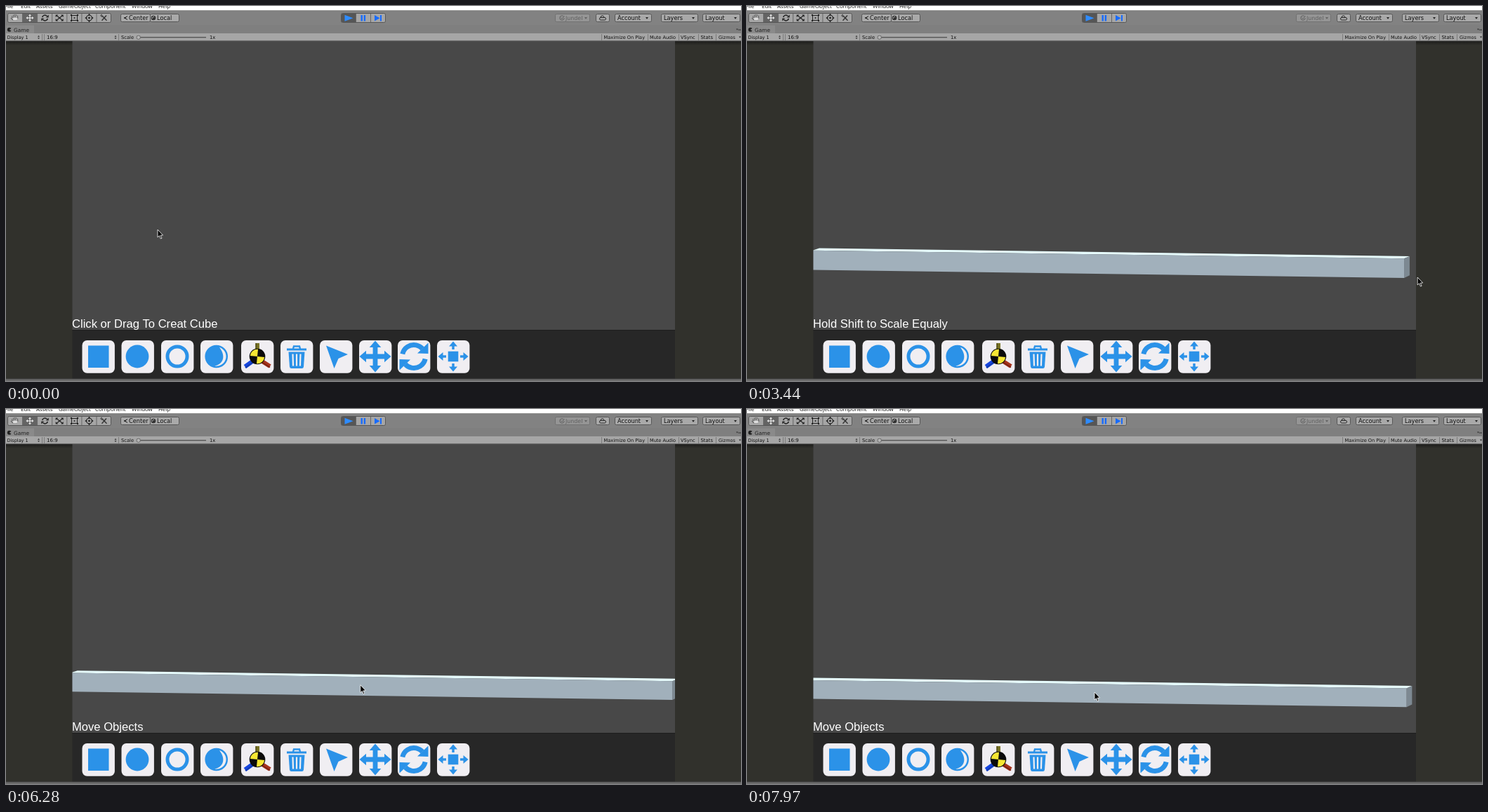
An HTML page with a canvas for the animation above (8000 ms loop, 1047x535 px).

```html
<!DOCTYPE html>
<html lang="en">
<head>
<meta charset="utf-8">
<title>Cube editor</title>
<style>
html, body { margin: 0; width: 100%; height: 100%; overflow: hidden; background: #31312c; }
canvas { display: block; }
</style>
</head>
<body>
<canvas id="stage" width="1047" height="535"></canvas>
<script>
const W = 1047, H = 535, LOOP = 8000;
const BLUE = '#2b92e8', PALE = '#f0eef2', TINT = '#e0dfe4';
const view = { x: 94.5, y: 50, w: 858.5, h: 412 };
const screen = document.getElementById('stage').getContext('2d');
let g = screen;

// Drawing helpers
function rect(x, y, w, h, fill) {
  g.fillStyle = fill;
  g.fillRect(x, y, w, h);
}
function poly(points, fill) {
  g.beginPath();
  points.forEach(p => g.lineTo(p[0], p[1]));
  g.closePath();
  g.fillStyle = fill;
  g.fill();
}
function line(points, color, width = 1) {
  g.beginPath();
  points.forEach(p => g.lineTo(p[0], p[1]));
  g.strokeStyle = color;
  g.lineWidth = width;
  g.stroke();
}
function disc(x, y, r, fill) {
  g.beginPath();
  g.arc(x, y, r, 0, 7);
  g.fillStyle = fill;
  g.fill();
}
function arc(x, y, r, from, to, color, width) {
  g.beginPath();
  g.arc(x, y, r, from, to);
  g.strokeStyle = color;
  g.lineWidth = width;
  g.stroke();
}
function round(x, y, w, h, r, fill, edge) {
  g.beginPath();
  g.roundRect(x, y, w, h, r);
  g.fillStyle = fill;
  g.fill();
  if (edge) {
    g.strokeStyle = edge;
    g.lineWidth = 1;
    g.stroke();
  }
}
function text(str, x, y, size, color = '#111', font = '"DejaVu Sans", sans-serif') {
  g.font = size + 'px ' + font;
  g.fillStyle = color;
  g.fillText(str, x, y);
}
function at(x, y, draw, turn = 0) {
  g.save();
  g.translate(x, y);
  g.rotate(turn);
  draw();
  g.restore();
}
function spin(x, y, draw) {
  for (let i = 0; i < 4; i++) at(x, y, draw, i * Math.PI / 2);
}

// Editor chrome
function menu() {
  rect(0, 0, W, 6.5, '#fff');
  const items = [['File', -2], ['Edit', 21], ['Assets', 43], ['GameObject', 75],
    ['Component', 127], ['Window', 179], ['Help', 217]];
  items.forEach(([s, x]) => text(s, x, 2.6, 7.9, '#111', '"Open Sans", sans-serif'));
}
function pill(x, w, label, tx) {
  round(x + .5, 11.5, w - 1, 11, 2, '#a9a9a9', '#565656');
  if (label) text(label, tx, 20, 8.2);
}
function drop(x, color = '#222') {
  poly([[x - 2, 16], [x + 2, 16], [x, 18.7]], color);
}
function tools() {
  round(2.5, 10.5, 147, 13, 2, '#a6a6a6', '#565656');
  rect(23, 11, 21, 12, '#646464');
  for (let x = 23.5; x < 140; x += 21.1) line([[x, 11], [x, 23]], '#666');

  // hand
  [['#222', 2.6], ['#ddd', 1.1]].forEach(([color, width]) => {
    [10.2, 12.2, 14.2, 16].forEach((x, i) => line([[x, 18], [x - .4, i % 3 ? 12.7 : 14]], color, width));
    line([[10.5, 19.5], [7.8, 16.5]], color, width);
    round(10, 16.5, 6, 4, 1.5, color);
  });
  // move
  spin(34, 17, () => {
    line([[0, 0], [4, 0]], '#e8e8e8', 1.2);
    poly([[3, -2], [5.5, 0], [3, 2]], '#e8e8e8');
  });
  // rotate
  [0, Math.PI].forEach(a => at(55.5, 17, () => {
    arc(0, 0, 3.9, 3.4, 5.5, '#222', 1.6);
    poly([[5.2, -4.6], [5.2, -.6], [1.2, -.8]], '#222');
  }, a));
  // scale
  line([[72.5, 14], [80, 20]], '#222', 1.2);
  line([[72.5, 20], [80, 14]], '#222', 1.2);
  [-1, 1].forEach(u => [-1, 1].forEach(v => {
    const x = 76.2 + u * 5.5, y = 17 + v * 4.5;
    poly([[x, y], [x - u * 3.6, y], [x, y - v * 3.4]], '#222');
  }));
  // rectangle
  g.strokeStyle = '#222';
  g.lineWidth = 1;
  g.strokeRect(93.5, 13.5, 8, 7);
  disc(97.5, 17, 1, '#222');
  [[93, 13], [102, 13], [93, 21], [102, 21]].forEach(p => disc(p[0], p[1], 1.2, '#222'));
  // transform
  arc(118.5, 17, 4, 0, 7, '#222', 1);
  disc(118.5, 17, 1.4, '#222');
  spin(118.5, 17, () => poly([[3.4, -2], [6.2, 0], [3.4, 2]], '#222'));
  // custom
  line([[136.5, 13.5], [143.5, 20.7]], '#333', 1.4);
  line([[143, 13.5], [136.5, 20.7]], '#333', 1.4);
  arc(136.5, 13.7, 1.5, 1.2, 5, '#333', 1);
}
function toolbar() {
  rect(0, 6.5, W, 21, '#828282');
  tools();
  pill(163, 43, 'Center', 175);
  pill(205, 42, 'Local', 215);
  rect(168, 16.2, 3, 1.6, '#222');
  [14.5, 19.5].forEach(y => line([[169, 17], [173, y]], '#222', 1));
  disc(210, 17, 3.3, '#333');
  arc(210, 17, 1.6, 2.5, 5.5, '#ccc', .8);

  round(477.5, 10.5, 63, 13, 2, '#a6a6a6', '#565656');
  rect(478, 11, 20, 12, '#565656');
  [498.5, 519.5].forEach(x => line([[x, 11], [x, 23]], '#666'));
  const play = '#176bff';
  poly([[482.5, 12.7], [494.5, 17.2], [482.5, 21.7]], '#2e8cff');
  rect(505.5, 13, 2.4, 8.5, play);
  rect(509.7, 13, 2.4, 8.5, play);
  poly([[525, 13], [532.5, 17.2], [525, 21.4]], play);
  rect(533, 13, 2, 8.5, play);

  round(782.5, 11.5, 49, 11, 2, '#959595', '#707070');
  text('Jundel', 797, 20, 7.9, '#606060');
  arc(792, 17, 3.2, 0, 5.5, '#606060', 1);
  line([[790.3, 16.5], [792, 18.4], [795.5, 14]], '#606060', 1);
  drop(826, '#606060');
  pill(840, 20);
  round(845.5, 16.5, 9, 3.5, 1.7, '#a9a9a9', '#222');
  arc(849.5, 16.3, 2.4, 3.1, 6.1, '#222', 1);
  pill(867, 53, 'Account', 871);
  pill(933, 53, 'Layers', 937);
  pill(992, 54, 'Layout', 996);
  [913, 979, 1039].forEach(x => drop(x));
}
function viewBar() {
  rect(0, 27, W, 12, '#7f7f7f');
  rect(0, 27.5, 40, 11.5, '#8a8a8a');
  disc(4.8, 33.8, 3, '#222');
  poly([[4.8, 33.8], [8.2, 31.5], [8.2, 36]], '#8a8a8a');
  text('Game', 11, 36.8, 7.4, '#222');
  line([[1043, 34], [1047, 34]], '#333', 1);
  poly([[1040, 32.5], [1043, 32.5], [1041.5, 34.5]], '#333');
  rect(0, 39, W, 11, '#a6a6a6');
  rect(0, 49.2, W, 1, '#666');

  text('Display 1', 1.5, 47.2, 6.5);
  text('16:9', 58, 47.2, 7);
  text('Scale', 164, 47.2, 6.7);
  text('1x', 290, 47.2, 6.8);
  [46.5, 156].forEach(x => {
    poly([[x - 1.5, 44], [x + 1.5, 44], [x, 42]], '#333');
    poly([[x - 1.5, 45.3], [x + 1.5, 45.3], [x, 47.3]], '#333');
  });
  [51.5, 54.5, 160.5, 848.5, 914.5, 958.5, 986.5, 1011.5]
    .forEach(x => line([[x, 40], [x, 49]], '#7c7c7c'));
  rect(188, 44, 97, 1.4, '#555');
  disc(188.7, 44.8, 3, '#666');
  disc(188.7, 44.8, 2.2, '#b5b5b5');
  text('Maximize On Play', 851.5, 47.2, 6.6);
  text('Mute Audio', 917, 47.2, 6.55);
  text('VSync', 961, 47.2, 6.7);
  text('Stats', 989.5, 47.2, 6.9);
  text('Gizmos', 1015, 47.2, 6.5);
  poly([[1044, 43.5], [1047, 43.5], [1045.5, 45.5]], '#222');
}
function backdrop() {
  rect(0, 0, W, H, '#31312c');
  const shade = g.createLinearGradient(0, 50, 0, 56);
  shade.addColorStop(0, '#1c1c1a');
  shade.addColorStop(1, '#31312c');
  rect(0, 50, W, 6, shade);
  rect(view.x, view.y, view.w, view.h, '#484848');
  rect(view.x, 462, view.w, 70, '#272727');
  rect(view.x, 462, view.w, 1, '#1d1d1d');
  rect(0, 532, W, 3, '#6c6c6c');
  rect(0, 531.5, W, 1, '#454545');
  menu();
  toolbar();
  viewBar();
}

// Bottom panel icons, each centred on 0,0
function ball() {
  disc(-.3, 0, 16.3, BLUE);
  g.beginPath();
  g.arc(-.3, 0, 13.8, -1.25, 1.75);
  g.bezierCurveTo(9, 11, 14, 0, 4, -13);
  g.fillStyle = PALE;
  g.fill();
}
function axes() {
  rect(-2.6, -19, 5.6, 10, '#7b7626');
  rect(-2.6, -19, 2, 10, '#5a561c');
  line([[-7, 7], [-17.5, 14.5]], '#1746e0', 6);
  line([[-7, 8.5], [-17, 16]], '#123bb0', 2);
  line([[7, 7], [18, 14]], '#a8341d', 6);
  line([[7, 8.5], [18, 15.5]], '#7d2413', 2);
  disc(0, 0, 11.3, '#0b0b0b');
  [.1, .1 + Math.PI].forEach(a => {
    g.beginPath();
    g.moveTo(0, 0);
    g.arc(0, 0, 10.3, a, a + Math.PI / 2);
    g.fillStyle = '#f7e733';
    g.fill();
  });
}
function trash() {
  rect(-14, -11.5, 28, 3, BLUE);
  line([[-5, -11], [-4, -14.5], [4, -14.5], [5, -11]], BLUE, 2.4);
  g.beginPath();
  g.moveTo(-11.5, -6.5);
  g.lineTo(11.5, -6.5);
  g.lineTo(10, 14.5);
  g.quadraticCurveTo(9.8, 17, 7.5, 17);
  g.lineTo(-7.5, 17);
  g.quadraticCurveTo(-9.8, 17, -10, 14.5);
  g.fillStyle = BLUE;
  g.fill();
  [-5.5, 0, 5.5].forEach(x => line([[x, -3.5], [x * .9, 13.5]], PALE, 2.2));
}
function cross() {
  spin(0, 0, () => poly([[0, -3.4], [13, -3.4], [13, -8.3], [22.5, 0], [13, 8.3], [13, 3.4], [0, 3.4]], BLUE));
}
function cycle() {
  [0, Math.PI].forEach(a => at(0, 0, () => {
    arc(0, 0, 16.5, 3.35, 5.55, BLUE, 7);
    poly([[20.5, -19.5], [20.5, -4], [5, -4.5]], BLUE);
  }, a));
}
function spread() {
  rect(-7.3, -7.3, 14.6, 14.6, BLUE);
  spin(0, 0, () => {
    rect(10, -1.7, 6, 3.4, BLUE);
    poly([[14.5, -6], [21.5, 0], [14.5, 6]], BLUE);
  });
}
const buttons = [
  [108.5, () => rect(-14.5, -15.5, 29.5, 31.5, BLUE)],
  [164.5, () => disc(-.5, 0, 16.4, BLUE)],
  [221, () => arc(0, 0, 14, 0, 7, BLUE, 5)],
  [277, ball],
  [335, axes],
  [391, trash],
  [447, () => poly([[-14, -15.5], [17, -3], [3.5, 3], [-2.5, 17]], BLUE)],
  [503, cross],
  [558, cycle],
  [614, spread]
];
function button(i, fill) {
  const [x, icon] = buttons[i];
  round(x, 477, 46.4, 46.8, 7, fill);
  at(x + 23, 500, icon);
}

// Motion: pointer keys are time, x, y
const keys = [
  [0, 216, 319], [25, 216, 319], [160, 165, 350], [370, 2, 470], [520, 50, 521],
  [750, 150, 505], [820, 150, 505], [1060, 131, 494], [1250, 131, 494],
  [1690, 114, 370], [2070, 104, 360], [2130, 104, 360], [2190, 101, 358],
  [2380, 101, 358], [2680, 461, 369], [3190, 910, 384], [3440, 955, 387],
  [3650, 968, 389], [4070, 969, 386], [4110, 969, 386], [4600, 740, 521],
  [4950, 538, 513], [5030, 537, 510], [5450, 532, 500], [5600, 532, 500],
  [5950, 506, 366], [6090, 506, 366], [6460, 503, 421], [6620, 502, 423],
  [7100, 502, 423], [7600, 495, 400], [7740, 495, 400], [7970, 495, 404], [8000, 495, 404]
];
function slope(i, k) {
  const a = keys[i - 1], b = keys[i], c = keys[i + 1];
  if (!a || !c) return 0;
  const p = (b[k] - a[k]) / (b[0] - a[0]), q = (c[k] - b[k]) / (c[0] - b[0]);
  return p * q > 0 ? 2 * p * q / (p + q) : 0;
}
// Monotone cubic through the keys
function pointer(t) {
  let i = 0;
  while (i < keys.length - 2 && keys[i + 1][0] <= t) i++;
  const a = keys[i], b = keys[i + 1], d = b[0] - a[0], u = (t - a[0]) / d;
  return [1, 2].map(k => {
    const s = u * u * (3 - 2 * u);
    return a[k] + (b[k] - a[k]) * s
      + d * u * (1 - u) * ((1 - u) * slope(i, k) - u * slope(i + 1, k));
  });
}

const DRAW = 2440, DONE = 4110, PICK = 5110, GRAB = 6090;
const TILT = .0137;

function cube(t) {
  const [cx, cy] = pointer(Math.min(t, DONE));
  const right = 423 + (cx - 461) * 1.0385;
  const tall = Math.max(1, 11 + (cy - 369) * .92);
  const left = 93, top = 348.8, fall = (right - left) * TILT;
  const back = right + 7.8;
  const backTop = 345.4 + (back - 103) * TILT;
  g.save();
  g.beginPath();
  g.rect(view.x, view.y, view.w, view.h);
  g.clip();
  if (t > GRAB) {
    const [x, y] = pointer(t), [x0, y0] = pointer(GRAB);
    g.translate(x - x0, y - y0);
  }
  if (right > left) {
    poly([[left, top], [103, 345.4], [back, backTop], [right, top + fall]], '#e6fbfc');
    poly([[right, top + fall], [back, backTop], [back, backTop + tall - .3],
      [right, top + fall + tall]], '#7d8992');
    poly([[left, top], [right, top + fall], [right, top + fall + tall], [left, top + tall]], '#a1b0bb');
  }
  g.restore();
}
function arrow(x, y) {
  at(x, y, () => {
    g.beginPath();
    [[0, 0], [0, 11], [2.5, 8.7], [4.3, 13], [6, 12.3], [4.2, 8.2], [7.6, 8]]
      .forEach(p => g.lineTo(p[0], p[1]));
    g.closePath();
    g.fillStyle = '#000';
    g.fill();
    g.strokeStyle = '#fff';
    g.lineWidth = .8;
    g.stroke();
  });
}

const base = document.createElement('canvas');
base.width = W;
base.height = H;
g = base.getContext('2d');
backdrop();
buttons.forEach((b, i) => button(i, PALE));
g = screen;

function frame(now) {
  const t = now % LOOP;
  g.drawImage(base, 0, 0);
  if (t >= 700 && t < DRAW) button(0, TINT);
  if (t >= 5030 && t < 6150) button(7, TINT);
  if (t >= DRAW) cube(t);
  const hint = t < DRAW ? 'Click or Drag To Creat Cube'
    : t < PICK ? 'Hold Shift to Scale Equaly' : 'Move Objects';
  text(hint, 94, 459, 16.6, '#fff', '"Liberation Sans", Arial, sans-serif');
  arrow(...pointer(t));
}
const start = performance.now();
function tick() {
  frame(performance.now() - start);
  requestAnimationFrame(tick);
}
tick();
</script>
</body>
</html>
```
